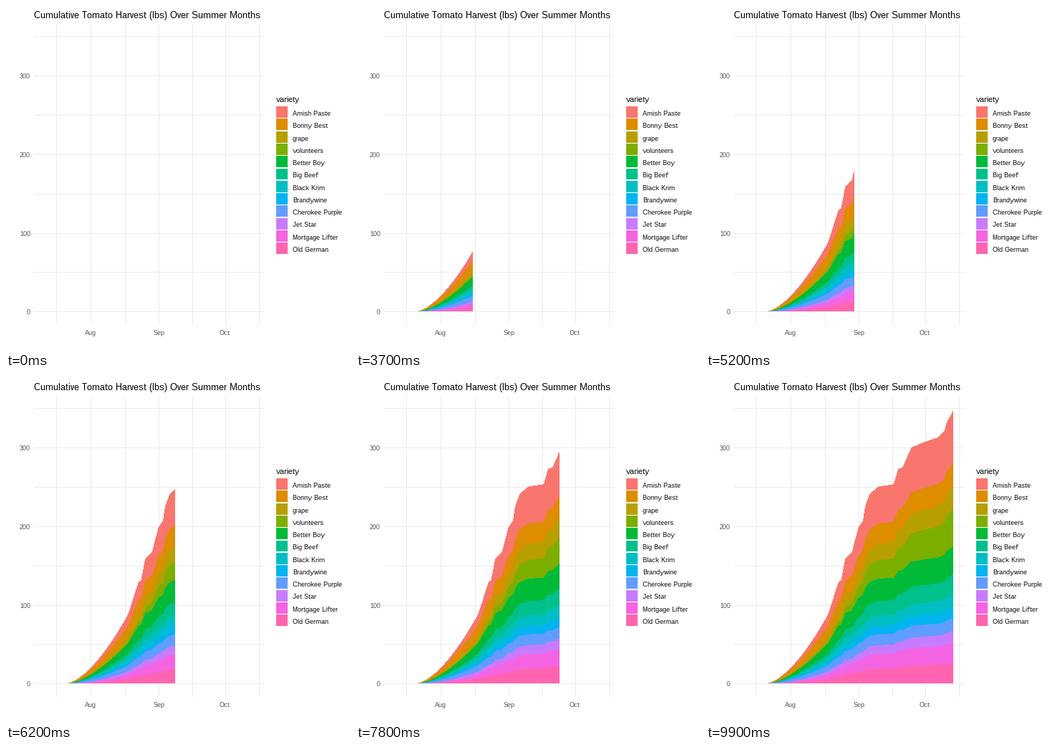
Recreate the animation shown at these times as a matplotlib script. Size 480 by 480 pixels, loop 10000 ms.

```python
import numpy as np
import matplotlib.pyplot as plt
from matplotlib.animation import FuncAnimation
from matplotlib.patches import Polygon, Rectangle

# Whole-pixel glyph widths without kerning.
plt.rcParams.update({
    "font.family": "Liberation Sans",
    "text.hinting": "native",
    "text.hinting_factor": 1,
    "text.kerning_factor": 6,
})

SIZE, DPI = 480, 100
FRAMES, INTERVAL = 100, 100
FIRST_DAY, LAST_DAY = 10, 95
X0, PX_PER_DAY = 53.6, 3.0716
Y0, PX_PER_LB = 426.2, 1.0965
PANEL = (39, 25, 360, 445)
GRID, AXIS_TEXT = "#EBEBEB", "#4D4D4D"
KEY_TOP, KEY_PITCH, KEY_SIZE = 140.17, 17.28, 15.86

# Name, colour, final pounds, growth exponent (below 1 ripens early).
VARIETIES = [
    ("Amish Paste", "#F8766D", 66, 1.15),
    ("Bonny Best", "#DE8C00", 29, 0.5),
    ("grape", "#B79F00", 29, 1.15),
    ("volunteers", "#7CAE00", 49, 2.3),
    ("Better Boy", "#00BA38", 35, 0.75),
    ("Big Beef", "#00C08B", 26, 1.15),
    ("Black Krim", "#00BFC4", 16, 0.7),
    ("Brandywine", "#00B4F0", 14, 1.0),
    ("Cherokee Purple", "#619CFF", 16, 0.55),
    ("Jet Star", "#C77CFF", 15, 1.05),
    ("Mortgage Lifter", "#F564E3", 26, 1.1),
    ("Old German", "#FF64B0", 26, 1.1),
]
FINAL, GROWTH = np.array([v[2:] for v in VARIETIES]).T[:, :, None]

# Turning points of the total harvest: (day, pounds).
EASE_END, EASE_POUNDS, EASE_POWER = 38, 87, 1.6
PICKINGS = [
    (38, 87), (40, 104), (43, 129.5), (44, 130.5), (46, 159), (49, 167),
    (52, 199), (54, 207), (55, 225), (57, 241), (61, 250.5), (68, 253.5),
    (70, 273), (72, 275), (76, 300), (82, 307.5), (88, 313), (91, 321),
    (92, 332), (95, 347),
]


def day_x(day):
    return X0 + PX_PER_DAY * day


def pound_y(pounds):
    return Y0 - PX_PER_LB * pounds


def total_pounds(days):
    """Eased start, then straight runs between the larger pickings."""
    progress = np.clip((days - FIRST_DAY) / (EASE_END - FIRST_DAY), 0, 1)
    early = EASE_POUNDS * progress ** EASE_POWER
    return np.where(days < EASE_END, early, np.interp(days, *zip(*PICKINGS)))


def band_edges(days):
    """Edges of all bands at the given days, from the top edge to the base."""
    total = total_pounds(days)
    progress = np.maximum(total / FINAL.sum(), 1e-6)
    amounts = FINAL * progress ** GROWTH
    amounts *= total / amounts.sum(axis=0)
    stacked = np.cumsum(amounts[::-1], axis=0)[::-1]
    # Unsmoothed fills light every pixel they touch, so inset by half a pixel.
    edges = np.minimum(pound_y(stacked) + 0.5, int(Y0))
    return np.vstack([edges, np.full(len(days), int(Y0))])


fig = plt.figure(figsize=(SIZE / DPI, SIZE / DPI), dpi=DPI, facecolor="white")
ax = fig.add_axes([0, 0, 1, 1])
ax.set(xlim=(0, SIZE), ylim=(SIZE, 0))
ax.axis("off")


def box(x, y, width, height, color):
    ax.add_patch(Rectangle((x, y), width, height, facecolor=color,
                           linewidth=0, antialiased=False))


def label(x, y, text, px, color="black", ha="left"):
    ax.text(x, y, text, fontsize=px * 72 / DPI, color=color, ha=ha,
            va="baseline")


left, top, right, bottom = PANEL
for pounds in range(0, 351, 50):
    row = round(pound_y(pounds))
    box(left, row, right - left, 1, GRID)
    if pounds % 100 == 0:
        label(34, row + 4, str(pounds), 9, AXIS_TEXT, "right")

for column in (70, 118, 166, 213, 260, 306, 353):
    box(column, top, 1, bottom - top, GRID)
for day, month in ((21, "Aug"), (52, "Sep"), (82, "Oct")):
    label(day_x(day), 459, month, 9, AXIS_TEXT, "center")

label(39, 17, "Cumulative Tomato Harvest (lbs) Over Summer Months", 13)
label(377, 134, "variety", 11)

bands = []
for i, (name, color, *_) in enumerate(VARIETIES):
    key_top = KEY_TOP + i * KEY_PITCH
    first, last = round(key_top), round(key_top + KEY_SIZE)
    box(377, first, 16, last - first, color)
    label(400, round(key_top + 12.8), name, 9)
    band = Polygon([(0, 0)] * 3, facecolor=color, linewidth=0,
                   antialiased=False, visible=False)
    bands.append(ax.add_patch(band))

# Each day appears on its nearest frame; frames between two days interpolate.
all_days = np.arange(LAST_DAY + 1)
day_frames = np.round(all_days * (FRAMES - 1) / LAST_DAY)


def update(frame):
    today = np.interp(frame, day_frames, all_days)
    shown = today > FIRST_DAY
    if shown:
        days = np.append(np.arange(FIRST_DAY, np.ceil(today)), today)
        x = day_x(days)
        x[-1] -= 0.5
        edges = band_edges(days)
    for i, band in enumerate(bands):
        band.set_visible(shown)
        if shown:
            upper = np.column_stack([x, edges[i]])
            lower = np.column_stack([x, edges[i + 1]])
            band.set_xy(np.vstack([upper, lower[::-1]]))
    return bands


animation = FuncAnimation(fig, update, frames=FRAMES, interval=INTERVAL,
                          repeat=True, repeat_delay=0, blit=False)
plt.show()
```
